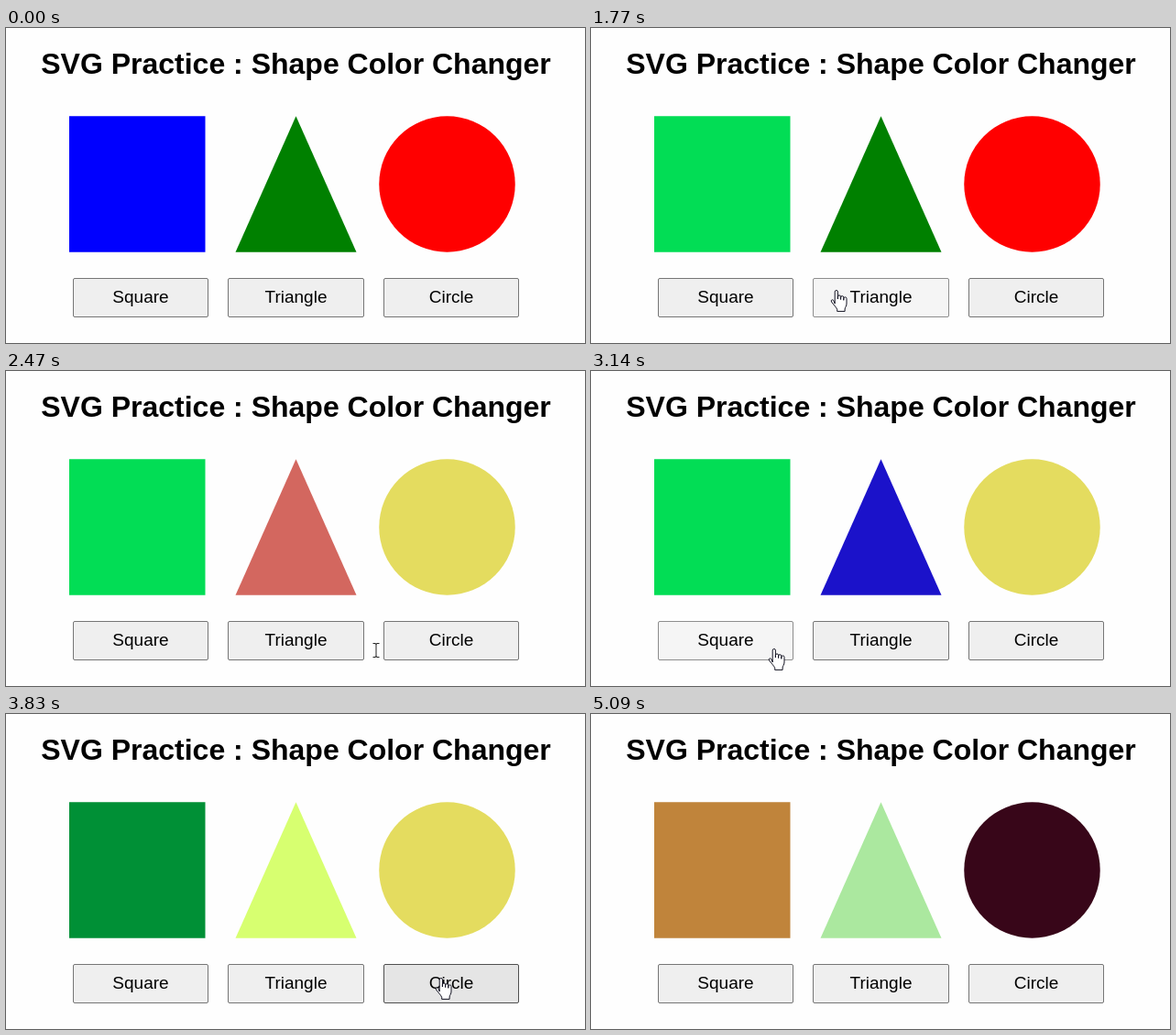
Write an HTML page that moves like this. It is 632 px wide and 344 px high and loops after 5.88 s.

```html
<!DOCTYPE html>
<html lang="en">
<head>
<meta charset="utf-8">
<title>Shape Color Changer</title>
<style>
  html, body { margin: 0; width: 100%; height: 100%; overflow: hidden; background: #fefefe; }
  svg { display: block; width: 632px; height: 344px; }
  text { font-family: "Liberation Sans", Arial, sans-serif; text-anchor: middle; fill: #000; }
  .title { font-size: 32px; font-weight: bold; }
  .label { font-size: 19px; }
  .cursor { fill: #fff; stroke: #111120; stroke-linejoin: round; }
</style>
</head>
<body>
<svg viewBox="0 0 632 344">
  <text class="title" x="316.5" y="50">SVG Practice : Shape Color Changer</text>
  <rect class="shape" x="69" y="96.25" width="148.5" height="148.5"/>
  <path class="shape" d="M316.5 96.25L382.5 244.75H250.5Z"/>
  <circle class="shape" cx="481.5" cy="170.5" r="74.25"/>
  <g id="buttons"></g>
  <g id="pointer">
    <path id="hand" class="cursor" transform="translate(-6.5 0)" d="M4.7 15V2.1a1.6 1.6 0 0 1 3.2 0V10V7.5a1.6 1.6 0 0 1 3.2 0v3V8.3a1.6 1.6 0 0 1 3.2 0v3V9.5a1.6 1.6 0 0 1 3.2 0V15c0 3-1.9 4.2-1.9 6v2.4H7.2V21.3C6 18.5 3 16 1 13c-1-1.8 1-3 2.2-1.6z"/>
    <path id="beam" d="M-3.5 .5h2.5q1 0 1 1q0-1 1-1h2.5M0 1V15M-3.5 15.5h2.5q1 0 1-1q0 1 1 1h2.5" fill="none" stroke="#222"/>
    <path id="arrow" class="cursor" d="M.5 .5V16.5L4.2 13L6.8 18.8L9.2 17.7L6.7 12H11.8Z"/>
  </g>
</svg>
<script>
const LOOP = 5880, START = 578, TICK = 97.6;   // the pointer moves in ticks
const SVG_NS = "http://www.w3.org/2000/svg";
const LEFT = 73, TOP = 273, PITCH = 169.5, WIDTH = 148, HEIGHT = 43;
const COLORS = ["#0000ff", "#008000", "#ff0000"];
const LOOK = {
  idle: ["#efefef", "#767676"],
  hover: ["#e5e5e5", "#4f4f4f"],
  active: ["#f5f5f5", "#8d8d8d"]
};

// A stop: arrive at (x, y), press one tick, then leave for the next stop
const stop = (arrive, press, x, y, color) => ({ arrive, press, leave: press + 1, x, y, color });
const ENTRY = { leave: 0, x: 165, y: 334 };
const EXIT = { arrive: 46, x: 180, y: 364 };
const STOPS = [
  stop(3, 5, 180, 296, "#02dd55"),
  stop(8, 12, 268, 286, "#d3675f"),
  stop(15, 16, 470, 291, "#e4dc5f"),
  stop(21, 22, 338, 303, "#1b12ca"),
  stop(26, 26, 200, 303, "#009036"),
  stop(29, 30, 290, 298, "#d7ff70"),
  stop(33, 35, 475, 288, "#380619"),
  stop(39, 39, 357, 298, "#abe89f"),
  stop(41, 43, 216, 298, "#c0843b")
];

const byId = id => document.getElementById(id);
const shapes = document.querySelectorAll(".shape");
const cursors = ["hand", "beam", "arrow"].map(byId);
const mix = (a, b, f) => a + (b - a) * f;

function add(tag, attrs) {
  const el = document.createElementNS(SVG_NS, tag);
  for (const key in attrs) el.setAttribute(key, attrs[key]);
  return byId("buttons").appendChild(el);
}

const boxes = ["Square", "Triangle", "Circle"].map((name, i) => {
  const x = Math.floor(LEFT + i * PITCH);
  const box = add("rect", { x: x + .5, y: TOP + .5, rx: 1.5, width: WIDTH - (i === 1 ? 0 : 1), height: HEIGHT - 1 });
  add("text", { class: "label", x: LEFT + i * PITCH + WIDTH / 2, y: 300 }).textContent = name;
  return box;
});

// Index of the button below a point, or -1
function buttonAt({ x, y }) {
  const i = Math.floor((x - LEFT) / PITCH);
  const inside = x - LEFT - i * PITCH < WIDTH && y >= TOP && y < TOP + HEIGHT;
  return inside ? i : -1;
}

function pointerAt(tick) {
  if (tick < 0 || tick >= EXIT.arrive) return null;
  let from = ENTRY;
  for (const to of [...STOPS, EXIT]) {
    if (tick < to.arrive) {
      const f = (tick - from.leave) / (to.arrive - from.leave);
      return { x: mix(from.x, to.x, f), y: mix(from.y, to.y, f) };
    }
    if (tick <= to.leave) return to;
    from = to;
  }
}

function draw(t) {
  const tick = Math.floor((t - START) / TICK);
  const colors = COLORS.slice();
  for (const s of STOPS) if (tick >= s.leave) colors[buttonAt(s)] = s.color;
  shapes.forEach((s, i) => s.setAttribute("fill", colors[i]));

  const p = pointerAt(tick);
  const over = p ? buttonAt(p) : -1;
  const pressed = STOPS.some(s => s.press === tick);
  let kind = "";
  if (p) {
    kind = over >= 0 ? "hand" : p.y < TOP + HEIGHT ? "beam" : "arrow";
    byId("pointer").setAttribute("transform", `translate(${Math.round(p.x)} ${Math.round(p.y)})`);
  }
  for (const c of cursors) c.style.display = c.id === kind ? "" : "none";

  boxes.forEach((box, i) => {
    const [fill, stroke] = LOOK[i !== over ? "idle" : pressed ? "active" : "hover"];
    box.setAttribute("fill", fill);
    box.setAttribute("stroke", stroke);
  });
}

const begin = performance.now();
function frame() {
  draw((performance.now() - begin) % LOOP);
  requestAnimationFrame(frame);
}
frame();
</script>
</body>
</html>
```
